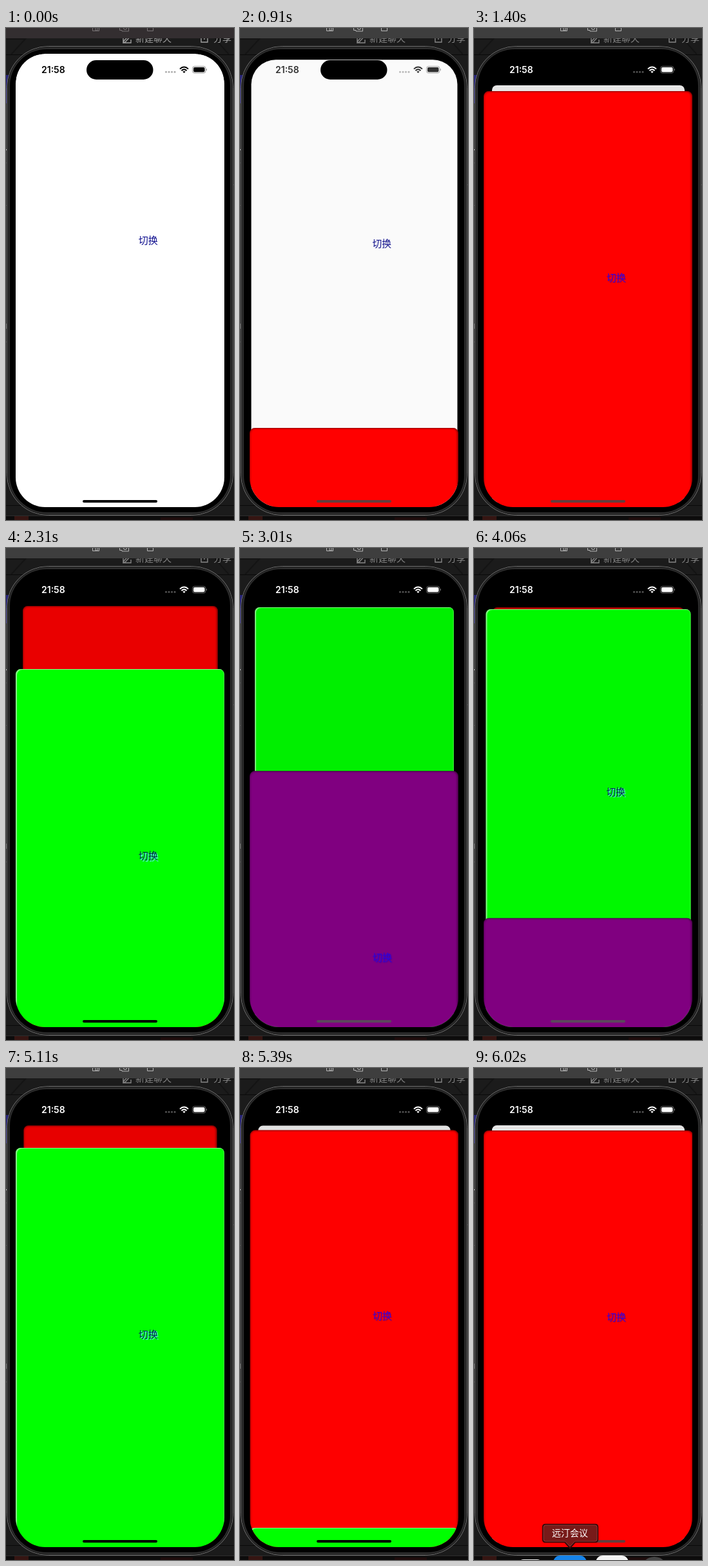
An HTML page for the animation above (6160 ms loop, 354x764 px).

```html
<!DOCTYPE html>
<html lang="zh-CN">
<head>
<meta charset="utf-8">
<title>Stacked sheets</title>
<style>
  html, body { margin: 0; width: 100%; height: 100%; overflow: hidden; background: #1b1b1b; }
  body, svg text { font-family: "Noto Sans CJK SC", "Noto Sans CJK", "Noto Sans", sans-serif; }
  body > svg, #screen { position: absolute; left: 0; top: 0; }
  #screen { left: 14.7px; top: 40.3px; width: 324.6px; height: 704.2px; border-radius: 46px; overflow: hidden; background: #000; }
  .view { position: absolute; left: 0; top: 0; width: 100%; height: 100%; transform-origin: 50% 0; border-radius: 8px 8px 0 0; }
  .view span { position: absolute; left: 191px; top: 279px; font-size: 15px; line-height: 20px; white-space: nowrap; }
  #home { position: absolute; left: 104.5px; top: 693px; width: 115.5px; height: 4px; border-radius: 2px; }
</style>
</head>
<body>
<svg width="354" height="764">
  <path d="M0 17H30L8 41M354 17H325L346 41" fill="none" stroke="#141414" stroke-width="2"/>
  <path d="M0 41.5H354M0 741.5H354" stroke="#0a0a0a"/>
  <path d="M0 209.5H3M0 275.5H3M0 487.5H3M351 243.5H354" stroke="#3a3a3a"/>
  <rect y="73" width="4" height="44" fill="#292679"/>
  <rect y="188" width="2" height="2" fill="#999"/>
  <rect y="459" width="2" height="8" fill="#555"/>
  <g id="labels" font-size="14" font-weight="500">
    <text x="201" y="21">新建聊天</text>
    <text x="322" y="21">分享</text>
    <path d="M194 12L185 22L182 23L183 20L191 12M187 12H182V23H194V18M306 12H303V22H313V12H310M308 10V18" fill="none" stroke="currentColor" stroke-width="1.4"/>
  </g>
  <g id="bar">
    <rect width="354" height="16"/>
    <path d="M134.5 -4V4.5H144.5V-4M139 0V4H142V0M176.5 -4V3.5H180V5H190.5V-4M219.5 -4V4.5H228.5V-4" fill="none" stroke="currentColor"/>
    <circle cx="185" cy="0" r="2.5" fill="none" stroke="currentColor"/>
  </g>
  <rect y="757" width="354" height="7" fill="#0d0c0c"/>
  <path d="M0 757.5H354" stroke="#2d2d2d"/>
  <rect x="13" y="758" width="22" height="6" fill="#351512"/>
  <rect x="240" y="760" width="50" height="4" fill="#1e0c0c"/>
  <rect x="1.5" y="28.5" width="351" height="728" rx="64" fill="#2b2b2b" stroke="#747474"/>
  <rect x="2.5" y="29.5" width="349" height="726" rx="63" fill="none" stroke="#151515"/>
  <rect x="6" y="33" width="342" height="719" rx="57" fill="#000"/>
</svg>

<div id="screen"></div>

<svg id="status" width="354" height="764" fill="currentColor">
  <rect x="125" y="50" width="103.5" height="30" rx="15" fill="#000"/>
  <text x="55" y="70" font-size="14" font-weight="600" style="font-family: Inter, 'Liberation Sans', sans-serif">21:58</text>
  <g opacity=".32">
    <circle cx="248.5" cy="68.3" r="1.5"/><circle cx="253" cy="68.3" r="1.5"/>
    <circle cx="257.5" cy="68.3" r="1.5"/><circle cx="262" cy="68.3" r="1.5"/>
  </g>
  <path d="M270 63.6Q276.5 57.4 283 63.6M272.5 66.2Q276.5 62.4 280.5 66.2" fill="none" stroke="currentColor" stroke-width="2"/>
  <path d="M274.3 67.8Q276.5 66 278.7 67.8L276.5 70Z"/>
  <rect x="289.5" y="59.5" width="20.5" height="10.5" rx="3.3" fill="none" stroke="currentColor" opacity=".4"/>
  <rect x="291" y="61" width="17.5" height="7.5" rx="2"/>
  <path d="M311 63Q313 64.7 311 66.5Z" opacity=".5"/>
</svg>

<svg width="354" height="764">
  <g id="dock">
    <rect x="68" y="763" width="39" height="40" rx="9" fill="#eee"/>
    <rect x="123" y="757" width="52" height="52" rx="11" fill="#1683e8"/>
    <rect x="189" y="757" width="51" height="52" rx="11" fill="#f4f4f4"/>
    <circle cx="280" cy="780" r="21" fill="#444"/>
  </g>
  <g id="tip">
    <path d="M111 709H188Q192 709 192 713V732Q192 736 188 736H157L149 745L141 736H111Q107 736 107 732V713Q107 709 111 709Z" fill="#771a19" stroke="#3a0808" stroke-width="2.5"/>
    <path d="M111 710H188Q191 710 191 713V732Q191 735 188 735H156.500L149 743L141.500 735H111Q108 735 108 732V713Q108 710 111 710Z" fill="none" stroke="#a34b48" stroke-width=".8"/>
    <text x="149" y="727" font-size="14" text-anchor="middle" fill="#fff">远汀会议</text>
  </g>
</svg>

<script>
const LOOP = 6160, STEP = 70, SHEET_TOP = 57, BACK_TOP = 49, HEIGHT = 648;
const $ = id => document.getElementById(id);
const lerp = (a, b, u) => a + (b - a) * u;
const clamp = u => Math.min(1, Math.max(0, u));

// Critically damped spring from 0 to 1
function spring(t, start) {
  const x = Math.max(0, t - start) * 0.016;
  return 1 - (1 + x) * Math.exp(-x);
}

const dark = 'inset -2px 0 3px rgba(0,0,0,.4), inset 1px 1px 3px rgba(0,0,0,.35)';
const light = 'inset 2px 1px 1px rgba(255,255,255,.55), inset -1px 0 1px rgba(255,255,255,.3)';
const views = [
  { fill: '#fff', ink: '#11118f', home: '#000', edge: 'none', glow: 'none', shown: () => 1 },
  { fill: '#f00', ink: '#3c00de', home: '#653d3d', edge: dark, glow: '1px 1px 1px rgba(70,0,90,.4)',
    shown: t => spring(t, 860) },
  { fill: '#0f0', ink: '#002b50', home: '#000', edge: light, glow: '1.5px 1.5px 1px #5ff0ff',
    shown: t => spring(t, 2094) - spring(t, 5090) },
  { fill: '#800080', ink: '#3500d8', home: '#5c465c', edge: dark, glow: '1px 1px 2px #3000b0',
    shown: t => spring(t, 2880) - spring(t, 3896) },
];

for (const v of views) {
  v.el = document.createElement('div');
  v.el.className = 'view';
  v.el.innerHTML = '<span>切换</span>';
  Object.assign(v.el.style, { background: v.fill, color: v.ink, boxShadow: v.edge, textShadow: v.glow });
  $('screen').append(v.el);
}
const home = document.createElement('div');
home.id = 'home';
$('screen').append(home);

function place(v, i, shown, depth) {
  const near = Math.min(depth, 1), far = Math.max(depth - 1, 0);
  const base = i ? SHEET_TOP + (1 - shown) * HEIGHT : 0;
  const y = lerp(base, BACK_TOP, near) + 11 * far;
  const scale = 1 - 0.08 * near - 0.025 * far;
  const style = v.el.style;
  style.transform = `translateY(${y}px) scale(${scale})`;
  style.filter = depth > 0.001 ? `brightness(${1 - 0.1 * near - 0.4 * far})` : 'none';
  style.visibility = shown > 0.001 ? 'visible' : 'hidden';
  if (!i) {
    const r = lerp(46, 8, near);
    style.borderRadius = `${r}px ${r}px 0 0`;
  }
  if (y < 693) home.style.background = v.home;
}

function draw(t) {
  const shown = views.map(v => v.shown(t));
  views.forEach((v, i) => place(v, i, shown[i], shown.slice(i + 1).reduce((a, b) => a + b, 0)));

  const tone = Math.round(255 * shown[1]);
  $('status').style.color = `rgb(${tone},${tone},${tone})`;

  const active = t >= 700;
  $('bar').style.fill = active ? '#3e3e3e' : '#332e30';
  $('bar').style.color = active ? '#b5b5b5' : '#777274';
  $('labels').style.fill = $('labels').style.color = active ? '#858585' : '#a0a0a0';

  const rise = clamp((t - 5670) / 350);
  $('dock').setAttribute('transform', `translate(0 ${8 * (1 - rise) ** 2})`);
  $('tip').style.display = t >= 5810 ? '' : 'none';
}

const begin = performance.now();
function tick() {
  const t = (performance.now() - begin) % LOOP;
  draw(Math.floor(t / STEP) * STEP);
  requestAnimationFrame(tick);
}
tick();
</script>
</body>
</html>
```
